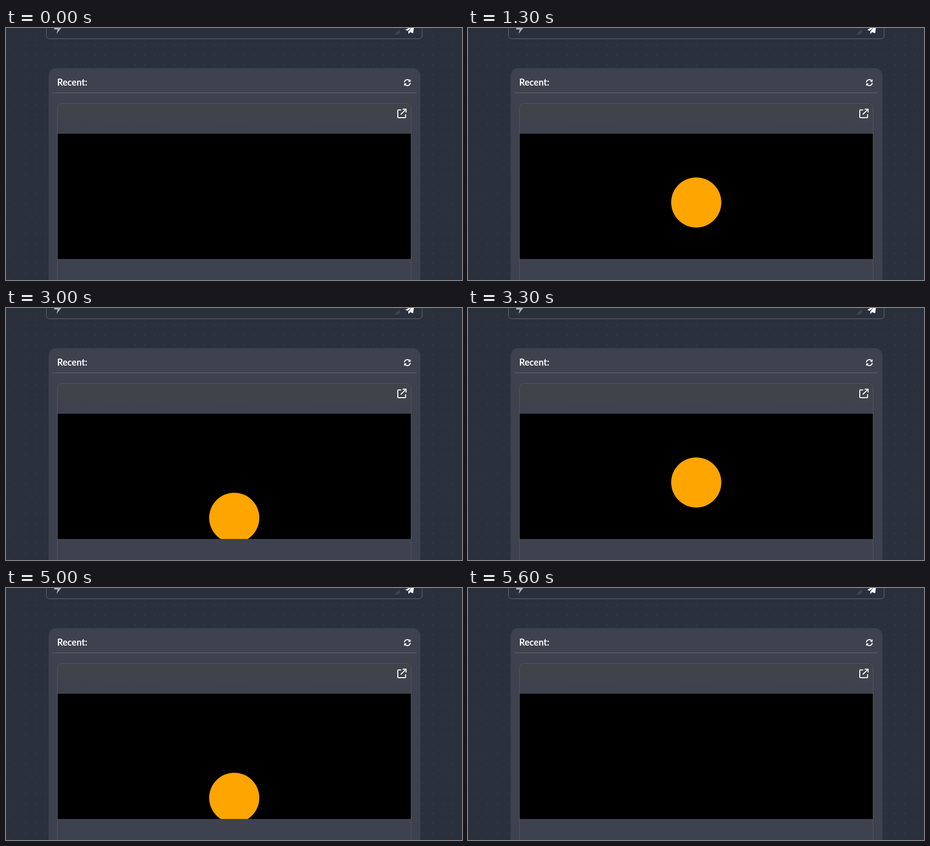
An HTML page for the animation above (5800 ms loop, 909 px wide and 503 px high).

```html
<!DOCTYPE html>
<html lang="en">
<head>
<meta charset="utf-8">
<title>Recent</title>
<style>
  html, body { margin: 0; width: 100%; height: 100%; overflow: hidden; background: #2b313c; }
  svg { display: block; width: 909px; height: 503px; }
  .title { font: 700 18px Lato, sans-serif; fill: #fff; }
  .icon { fill: none; stroke: #fff; stroke-width: 2; stroke-linecap: round; stroke-linejoin: round; }
</style>
</head>
<body>
<svg viewBox="0 0 909 503">
  <defs>
    <pattern id="dots" x="9.6" y="4.6" width="19.8" height="19.8" patternUnits="userSpaceOnUse">
      <circle cx="9.9" cy="9.9" r="1" fill="#3d434e"/>
    </pattern>
    <linearGradient id="header" x1="0" y1="0" x2="0" y2="1">
      <stop offset="0" stop-color="#3e4449"/>
      <stop offset=".55" stop-color="#3e4449"/>
      <stop offset=".65" stop-color="#3d424e"/>
    </linearGradient>
    <clipPath id="screen"><rect x="103" y="211" width="704" height="250"/></clipPath>
  </defs>

  <rect width="909" height="503" fill="url(#dots)"/>

  <!-- message box -->
  <rect x="80.5" y="-40.5" width="749" height="62" rx="6" fill="#2b313c" stroke="#686d76"/>
  <path d="M97-6h10l-2.5 5.5h6L100.500 12 103 3h-7z" fill="#adb2bb"/>
  <path d="M776.500 12.500l9-9m-5 9l5-5" stroke="#777b82" fill="none"/>
  <path d="M814-6l-2.500 16.500-6-2.300-3.500 3.800V7l7-8.500-8.500 7.200L796 3.500z" fill="#fff"/>

  <!-- card -->
  <rect x="85" y="80" width="741" height="450" rx="15" fill="#3d424e"/>
  <text class="title" x="102" y="114.500">Recent:</text>
  <path d="M92 129.500h726" stroke="#646972"/>
  <g class="icon">
    <path d="M794.300 107.800a5.900 5.900 0 0 1 10.700-2.100M805.700 110.200a5.900 5.900 0 0 1-10.700 2.100"/>
    <path d="M806 103.300v3.700h-3.700zM794 114.700V111h3.700z" fill="#fff" stroke-width="1"/>
  </g>

  <!-- preview panel -->
  <rect x="102.500" y="150.500" width="705" height="60.500" fill="none"/>
  <path d="M103 211v-50q0-10 10-10h684q10 0 10 10v50z" fill="url(#header)"/>
  <rect x="102.500" y="150.500" width="705" height="400" rx="10" fill="none" stroke="#535860"/>
  <path class="icon" d="M787 163.500h-4.500q-1.500 0-1.500 1.500v12.500q0 1.500 1.500 1.500h12.500q1.500 0 1.500-1.500V173M787.500 172l9-9M791.500 162h6v6"/>

  <g clip-path="url(#screen)">
    <rect x="103" y="211" width="704" height="250"/>
    <circle id="ball" cx="455" cy="600" r="50" fill="orange"/>
  </g>
</svg>
<script>
  const LOOP = 5800, STEP = 100, BOUNCE = 2000;
  const PEAK_TIME = 1218, PEAK_Y = 336.6, GRAVITY = 1730;
  const ball = document.getElementById('ball');

  function draw() {
    const time = Math.floor(performance.now() % LOOP / STEP) * STEP;
    const seconds = (time % BOUNCE - PEAK_TIME) / 1000;
    ball.setAttribute('cy', PEAK_Y + GRAVITY * seconds ** 2);
    requestAnimationFrame(draw);
  }
  draw();
</script>
</body>
</html>
```
